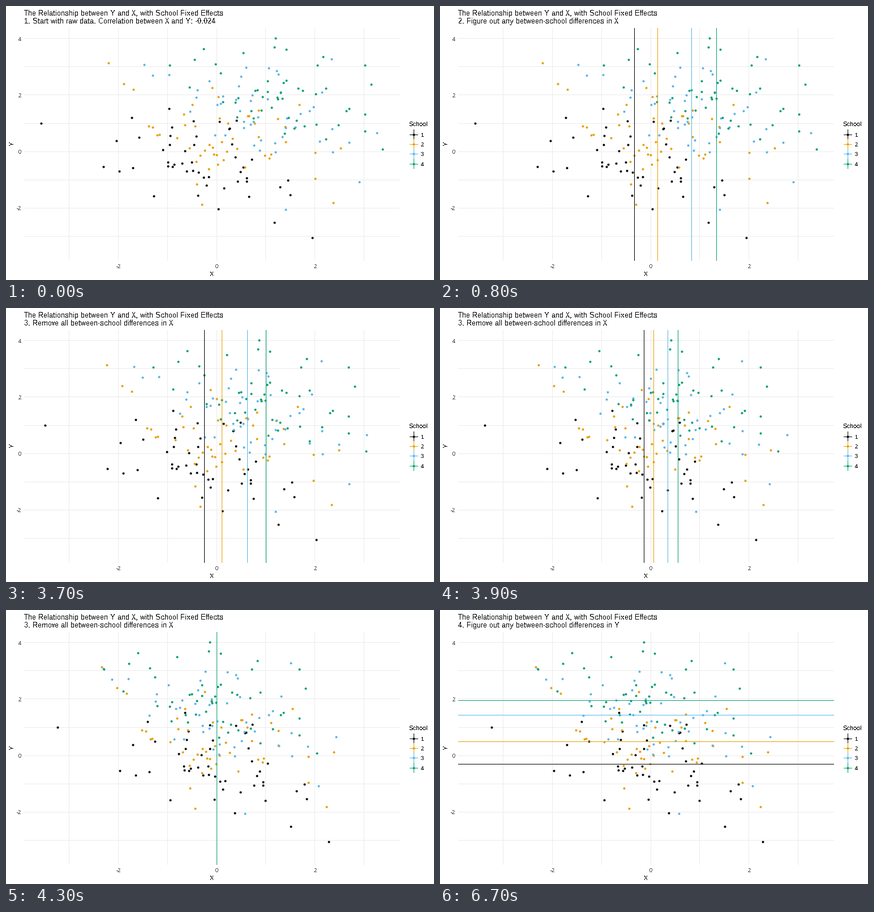
Animation of 756x486 px, one loop 8 s. Source, as a matplotlib script:

```python
import math

import matplotlib.pyplot as plt
import numpy as np
from matplotlib.animation import FuncAnimation

W, H, DPI = 756, 486, 72
STEP_MS, LOOP_MS = 100, 8000
LEFT, RIGHT, TOP, BOTTOM = 32, 695, 39, 451
X0, Y0 = 372.2, 258.2          # pixel position of the data origin
UNIT_X, UNIT_Y = 86.75, 50.15  # pixels per data unit

# Per school: colour, mean position in pixels, a few outlying points.
SCHOOLS = [
    ("#000000", (343.5, 273),
     [(62, 208), (541, 411), (474, 384), (195, 239), (375, 360)]),
    ("#E69F00", (384.5, 233),
     [(181, 101), (208, 138), (578, 349), (591, 252), (346, 352)]),
    ("#56B4E9", (444.5, 186),
     [(244, 104), (655, 225), (624, 312), (575, 94), (494, 361)]),
    ("#009E73", (488.5, 160),
     [(476, 57), (289, 105), (665, 254), (349, 76), (645, 139)]),
]
PER_SCHOOL = 50
SPREAD_X, SPREAD_Y, CORR = 76, 43, 0.35

SUBTITLES = [
    (0, "1. Start with raw data. Correlation between X and Y: -0.024"),
    (500, "2. Figure out any between-school differences in X"),
    (3500, "3. Remove all between-school differences in X"),
    (6400, "4. Figure out any between-school differences in Y"),
]

plt.rcParams.update({
    "font.family": "Liberation Sans",
    "text.hinting": "default",
    "text.hinting_factor": 1,
    "text.kerning_factor": 6,
    "text.antialiased": False,
})
fig = plt.figure(figsize=(W / DPI, H / DPI), dpi=DPI, facecolor="white")
ax = fig.add_axes([0, 0, 1, 1])
ax.set_xlim(0, W)
ax.set_ylim(H, 0)
ax.axis("off")


def line(xs, ys, color, z=1):
    return ax.plot(xs, ys, color=color, lw=1, zorder=z, antialiased=False,
                   solid_capstyle="butt")[0]


def dots(xs, ys, color):
    return ax.plot(xs, ys, "o", color=color, ms=4, mew=0, zorder=2,
                   antialiased=False)[0]


def label(x, y, text, size, color="black", **kw):
    return ax.text(x, y, text, fontsize=size, color=color, **kw)


def vline(x, color, z=1):
    x = math.floor(x)
    return line([x, x], [TOP, BOTTOM], color, z)


def hline(y, color, z=1):
    y = math.floor(y)
    return line([LEFT, RIGHT], [y, y], color, z)


def cloud(rng, center, count):
    """Correlated normal scatter with its mean exactly at the center."""
    u, v = np.clip(rng.standard_normal((2, count)), -2, 2)
    u, v = [(a - a.mean()) / a.std() for a in (u, v)]
    v = CORR * u + math.sqrt(1 - CORR ** 2) * v
    return np.column_stack([center[0] + SPREAD_X * u,
                            center[1] + SPREAD_Y * v])


# Grid and axes
for k in range(-3, 5):
    x, y = X0 + UNIT_X * k, Y0 - UNIT_Y * k
    hline(y, "#EBEBEB")
    if k < 4:
        vline(x, "#EBEBEB")
    if k in (-2, 0, 2, 4):
        label(27, y + 4, str(k), 9, "#4D4D4D", ha="right")
    if k in (-2, 0, 2):
        label(x, 465, str(k), 9, "#4D4D4D", ha="center")
label(363, 479, "X", 11, ha="center")
label(11, 244, "Y", 11, ha="center", va="center", rotation=90)
label(32, 17, "The Relationship between Y and X, with School Fixed Effects", 13)
subtitle = label(32, 31, "", 13)

# Legend, data and mean lines
label(712, 213, "School", 11)
rng = np.random.default_rng(12)
groups = []
for i, (color, mean, outer) in enumerate(SCHOOLS):
    y = math.floor(228.4 + 17.28 * i)
    line([713, 727], [y, y], color)
    line([720, 720], [y - 9, y + 8], color)
    dots([720], [y], color)
    label(733, y + 4, str(i + 1), 9)

    points = np.vstack([outer, cloud(rng, mean, PER_SCHOOL - len(outer))])
    groups.append((mean[0], points[:, 0], dots(*points.T, color),
                   vline(mean[0], color, 3), hline(mean[1], color, 3)))


def progress(ms):
    """Sine ease from raw (0) to demeaned (1)."""
    t = min(max((ms - 3400) / 900, 0), 1)
    return (1 - math.cos(math.pi * t)) / 2


def update(frame):
    ms = frame * STEP_MS
    subtitle.set_text([text for start, text in SUBTITLES if start <= ms][-1])
    for mean_x, xs, marker, x_rule, y_rule in groups:
        shift = (X0 - mean_x) * progress(ms)
        marker.set_xdata(xs + shift)
        x_rule.set_xdata([math.floor(mean_x + shift)] * 2)
        x_rule.set_visible(800 <= ms < 6400)
        y_rule.set_visible(ms >= 6700)


anim = FuncAnimation(fig, update, frames=LOOP_MS // STEP_MS, interval=STEP_MS,
                     repeat=True, repeat_delay=0, blit=False)
plt.show()
```
